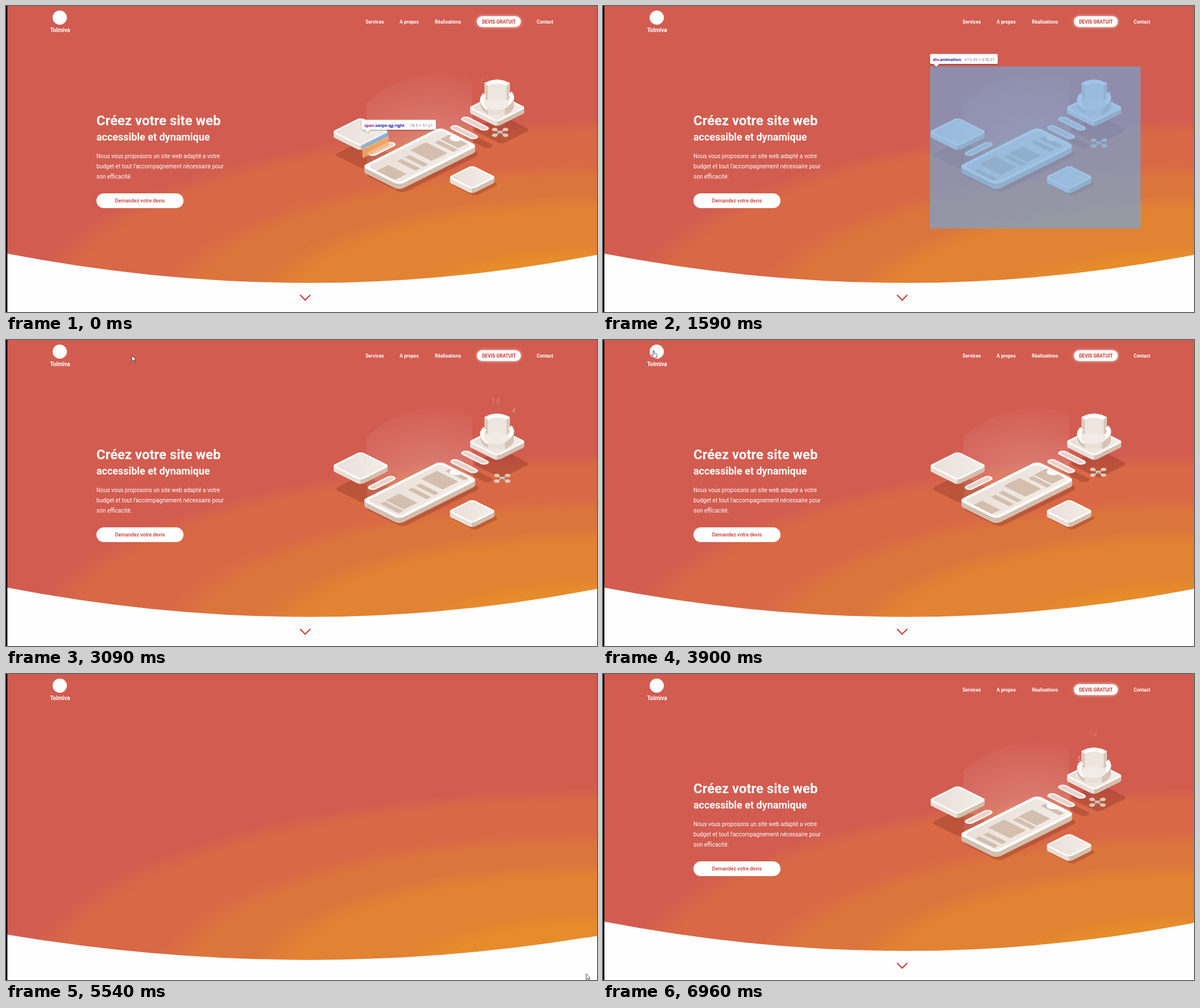
Animation, 1039 px wide and 539 px high, one loop 7060 ms. Source, as an HTML page:

```html
<!DOCTYPE html>
<html lang="fr">
<head>
<meta charset="utf-8">
<title>Tolmiva</title>
<style>
  html, body { margin: 0; width: 100%; height: 100%; overflow: hidden; background: #fefefe; }
  svg { display: block; width: 100%; height: 100%; }
  text { font-family: Roboto, sans-serif; fill: #fff; }
  .nav { font-size: 8.3px; font-weight: 700; }
  .red { fill: #c8382f; }
  .copy { font-size: 10.05px; }
  .glyph { font-weight: 700; text-anchor: middle; fill: #fbd9d2; }
  .tip text, #status text { font-family: "Open Sans", "Noto Sans", sans-serif; font-size: 7.2px; }
  .tip .name { font-weight: 700; fill: #1a1aa6; }
  .tip .tag { fill: #881280; }
  .tip .size { fill: #777; text-anchor: end; }
  #status text { font-size: 6.8px; fill: #d4d4d4; }
</style>
</head>
<body>
<svg id="stage" viewBox="0 0 1039 539" xmlns="http://www.w3.org/2000/svg"></svg>
<script>
const LOOP = 7060;
const SCROLL_PERIOD = 115;
const BEIGE = '#d4bfae', BLUE = 'rgba(111,168,220,.66)',
      ORANGE = 'rgba(246,178,107,.8)', YELLOW = 'rgba(255,229,153,.85)';

// Isometric plane: u runs up-right, v runs down-right.
const iso = (x, y, body) => `<g transform="matrix(1 -.5 1 .5 ${x} ${y})">${body}</g>`;
const rect = (u, v, w, h, r, fill, extra = '') =>
  `<rect x="${u}" y="${v}" width="${w}" height="${h}" rx="${r}" fill="${fill}" ${extra}/>`;
const path = (d, fill, extra = '') => `<path d="${d}" fill="${fill}" ${extra}/>`;
const text = (x, y, cls, body, extra = '') =>
  `<text x="${x}" y="${y}" class="${cls}" ${extra}>${body}</text>`;

function block(x, y, w, h, r, depth, side, inset) {
  let out = '';
  for (let k = depth; k > 0; k--) out += iso(x, y + k, rect(0, 0, w, h, r, side));
  return out + iso(x, y, rect(0, 0, w, h, r, '#fff') +
    rect(inset, inset, w - 2 * inset, h - 2 * inset, r - 2, 'url(#face)'));
}
const tile = (x, y, size) => block(x, y, size, size, 6, 8, 'url(#side)', 3);
const pill = (x, y, w, h) =>
  iso(x, y, rect(1.2, 1.2, w - 2.4, h - 2.4, 5, '#ecd2ca', 'stroke="#fff" stroke-width="2.4"'));
const shadow = (x, y, w, h, r) => iso(x, y, rect(0, 0, w, h, r, '#6e2018', 'opacity=".27"'));

function tip(id, x, y, width, tag, name, size, highlight) {
  return `<g id="${id}" class="tip">${highlight}
    <g filter="url(#drop)">
      <rect x="${x}" y="${y}" width="${width}" height="17.5" rx="2" fill="#fff"/>
      ${path(`M${x + 5.5} ${y + 17}h11l-5.5 5.5z`, '#fff')}
    </g>
    ${text(x + 5, y + 12, 'name', `<tspan class="tag">${tag}</tspan>.${name}`)}
    ${text(x + width - 5.5, y + 12, 'size', size)}</g>`;
}

function screenBlocks() {
  const thin = u => rect(u, 22, 8, 33, 0, BEIGE);
  let out = '';
  for (const u of [-SCROLL_PERIOD, 0, SCROLL_PERIOD])
    out += rect(u, 14, 28, 38, 0, BEIGE) + thin(u + 35) +
      rect(u + 46, 21, 24, 32, 0, BEIGE) + thin(u + 84) + thin(u + 98);
  return out;
}

const podium =
  path('M834 164Q834 180 847 189Q864 195 881 190Q893 183 893 164Z', '#e9dfd7') +
  path('M841 136Q863 124 886 136V168H841Z', '#eee5de') +
  path('M841 136L847 140V166L841 162ZM886 136L880 140V166L886 162Z', '#d9c8bb') +
  path('M841 136Q863 123 886 136L880 140Q863 133 847 140Z', '#fff') +
  path('M842 156Q835 162 838 171Q841 177 847 180M886 153Q892 160 888 168Q885 173 880 175',
       'none', 'stroke="#fff" stroke-width="7.5"') +
  path('M834 168Q837 179 847 184V190Q834 183 834 174ZM877 178Q890 174 893 163V178Q889 188 877 192Z', '#d6c4b6') +
  '<ellipse cx="862.5" cy="173" rx="22" ry="10" fill="#f2ebe6"/>';

const drone = [[-9.5, -5], [9.5, -5], [-9.5, 5], [9.5, 5]].map(([x, y]) =>
  `<path d="M0 0L${x} ${y}" stroke="#c6b3a4" stroke-width="2.2"/>
   <ellipse cx="${x}" cy="${y}" rx="5" ry="3" fill="#dccbbd"/>`).join('') +
  '<ellipse rx="4" ry="2.8" fill="#d5cbc4"/><ellipse cy="2" rx="2" ry="1.6" fill="#77818b"/>';

const bar = (d, color) => path(d, 'none', `stroke="${color}" stroke-width="9" stroke-linecap="round"`);

// Soft steps between the colour bands, from the corner outwards.
function sunsetStops() {
  const colors = ['#e68c2b', '#e28233', '#dc753c', '#d86846', '#d25c50'];
  const edges = [110, 194, 249, 327];
  return edges.map((r, i) => [[r - 12, colors[i]], [r + 12, colors[i + 1]]]).flat()
    .map(([r, color]) => `<stop offset="${r / 380}" stop-color="${color}"/>`).join('');
}

stage.innerHTML = `
<defs>
  <radialGradient id="sunset" gradientUnits="userSpaceOnUse" cx="0" cy="0" r="380"
    gradientTransform="translate(1039 539) scale(3 1)">${sunsetStops()}</radialGradient>
  <radialGradient id="glow" gradientUnits="userSpaceOnUse" cx="0" cy="0" r="122"
    gradientTransform="translate(750 241) scale(1.55 1)">
    <stop offset="0" stop-color="#fff" stop-opacity=".22"/>
    <stop offset=".6" stop-color="#fff" stop-opacity=".1"/>
    <stop offset="1" stop-color="#fff" stop-opacity=".02"/>
  </radialGradient>
  <linearGradient id="face" x2="1" y2="1">
    <stop stop-color="#e9dfd8"/><stop offset="1" stop-color="#f3ede8"/>
  </linearGradient>
  <linearGradient id="side" x2="1" y2="1">
    <stop offset=".5" stop-color="#e9dfd7"/><stop offset=".5" stop-color="${BEIGE}"/>
  </linearGradient>
  <filter id="halo" x="-20%" y="-60%" width="140%" height="220%">
    <feDropShadow dx="0" dy="0" stdDeviation="2.5" flood-color="#fff" flood-opacity=".8"/>
  </filter>
  <filter id="drop" x="-10%" y="-30%" width="120%" height="180%">
    <feDropShadow dx="0" dy="1" stdDeviation="1.2" flood-opacity=".4"/>
  </filter>
  <clipPath id="screen"><rect x="5" y="5" width="128" height="56" rx="4"/></clipPath>
</defs>
<rect width="1039" height="539" fill="#fefefe"/>

<g id="page">
  <path id="hero" fill="url(#sunset)"/>
  <circle cx="94.5" cy="20.5" r="12.5" fill="#fff"/>
  ${text(95, 46, '', 'Tolmiva', 'text-anchor="middle" font-size="10" font-weight="700"')}
  <g id="nav" class="nav">
    ${text(632, 30.5, '', 'Services')}
    ${text(692, 30.5, '', 'A propos')}
    ${text(754, 30.5, '', 'Réalisations')}
    <rect x="828" y="18" width="77" height="19" rx="9.5" fill="#fff" filter="url(#halo)"/>
    ${text(866.5, 30.5, 'red', 'DEVIS GRATUIT', 'text-anchor="middle"')}
    ${text(933, 30.5, '', 'Contact')}
  </g>
  <g id="content">
    ${text(159, 209.6, '', 'Créez votre site web', 'font-size="23.9" font-weight="700"')}
    ${text(159, 236.8, '', 'accessible et dynamique', 'font-size="17.95" font-weight="700"')}
    ${text(159, 268.4, 'copy', 'Nous vous proposons un site web adapté a votre')}
    ${text(159, 286.2, 'copy', "budget et tout l'accompagnement nécessaire pour")}
    ${text(159, 304.1, 'copy', 'son efficacité.')}
    <rect x="159" y="330" width="153" height="26" rx="13" fill="#fff"/>
    ${text(235.5, 346, 'red', 'Demandez votre devis', 'text-anchor="middle" font-size="8.85" font-weight="500"')}

    ${shadow(577, 262, 51, 51, 6)}
    ${shadow(820, 218, 51, 51, 6)}
    ${shadow(782, 314, 42.5, 42.5, 6)}
    ${shadow(802.5, 230, 12, 44, 6)}
    ${shadow(631, 297, 138, 66, 8)}
    ${path('M633 171Q690 120 758 120Q796 120 819 130L821 246L764 216L635 284Z', 'url(#glow)')}
    ${tile(572.5, 221.75, 51)}
    ${pill(632.5, 259.75, 44, 12)}
    ${block(625.3, 282.5, 138, 66, 8, 9, BEIGE, 5)}
    ${iso(625.3, 282.5, `<g clip-path="url(#screen)"><g id="scroll">${screenBlocks()}</g>
      <circle cx="133" cy="33" r="8" fill="#fff"/></g>`)}
    ${tile(777, 301.75, 42.5)}
    ${text(861, 0, 'glyph', '1#', 'id="rank" font-size="14.5"')}
    ${text(893, 0, 'glyph', '€', 'id="euro" font-size="11.5"')}
    ${text(837, 0, 'glyph', '$', 'id="dollar" font-size="11.5"')}
    ${tile(812.5, 179.25, 51)}
    ${podium}
    ${pill(777.5, 214.25, 12, 44)}
    ${pill(796.5, 199.25, 12, 44)}
    <g id="drone">${drone}</g>
  </g>
  <path id="chevron" d="M517 509L526 518L535 509" fill="none" stroke="#c8382f" stroke-width="2"/>
  ${tip('swipeTip', 625, 200.5, 131, 'span', 'swipe-qg-right', '78.5 × 51.21',
    path('M625 245L672 221.5L673 229L626 252Z', BLUE) + path('M626 252L673 229V245L627 268Z', ORANGE))}
  ${tip('divTip', 575, 84.5, 119, 'div', 'animation', '619.39 × 478.27',
    rect(575, 106.5, 370, 285.5, 0, BLUE))}
  ${tip('stairTip', 797, 172.5, 129.5, 'span', 'staircase-ref1', '91.92 × 45.96',
    iso(796, 199.25, rect(1, 1, 11, 43, 0, BLUE, `stroke="${YELLOW}" stroke-width="2"`)))}
</g>

<g id="loader">
  ${bar('M517.5 244L500 275', '#d0453c')}
  ${bar('M534.5 244L552 275', '#5b979f')}
  ${bar('M508.5 292H544.5', '#fbc30f')}
</g>
<g id="status">
  <path d="M2 529.5H178Q180 529.5 180 532V539H2Z" fill="#35363a"/>
  ${text(5, 537.8, '', 'https://vigilant-mestorf-41b7d4.netlify.app/index.html')}
</g>
<g id="cursor" stroke="#222" stroke-width=".8" stroke-linejoin="round">
  ${path('M0 0V10.6L2.5 8.4L4.2 12L5.7 11.3L4.1 7.8H7.2Z', '#fff', 'id="arrow"')}
  ${path('M3 1Q4 0 5 1V5.3L8.6 6.2Q10.4 6.8 10 8.8L9 13.6H4L.4 9Q.4 7.2 2 8L3 9Z', '#fff', 'id="hand"')}
</g>
<rect width="2.4" height="539" fill="#000"/>`;

const el = id => document.getElementById(id);
const clamp = x => Math.max(0, Math.min(1, x));
const ramp = (t, from, to) => clamp((t - from) / (to - from));
const smooth = x => x * x * (3 - 2 * x);
const show = (id, on) => el(id).setAttribute('visibility', on ? 'inherit' : 'hidden');
const fade = (id, a) => el(id).setAttribute('opacity', a);
const move = (id, x, y) => el(id).setAttribute('transform', `translate(${x} ${y})`);

// Interpolates keys of the form [time, ...values].
function track(keys, t, ease = x => x) {
  const i = keys.findIndex(key => key[0] > t);
  if (i === 0) return keys[0].slice(1);
  if (i < 0) return keys.at(-1).slice(1);
  const a = keys[i - 1], b = keys[i], p = ease((t - a[0]) / (b[0] - a[0]));
  return a.slice(1).map((v, k) => v + (b[k + 1] - v) * p);
}

const cursorKeys = [[2280, 995, 19], [2400, 995, 29], [2550, 995, 29], [3240, 116, 27], [3360, 85, 18],
  [4170, 85, 18], [4450, 520, 240], [4660, 894, 403], [4800, 894, 403], [5280, 1020, 528]];

function rise(id, t, base, peak, starts) {
  const start = starts.find(s => t >= s && t < s + 2000);
  const p = start === undefined ? 0 : (t - start) / 2000;
  el(id).setAttribute('y', base - 38 * p);
  fade(id, peak * Math.sin(Math.PI * p));
}

function draw(t) {
  const loading = t >= 4450 && t < 5280, reloaded = t >= 5280;
  show('page', !loading);
  show('loader', loading);
  show('status', t >= 4050 && t < 5280);

  const drop = reloaded ? track([[5280, 1.7], [5540, 1], [5750, .35], [6000, 0]], t)[0] : 0;
  el('hero').setAttribute('d',
    `M0 0H1039V${438.2 + 23 * drop}Q530 ${538.4 + 9 * drop} 0 ${435.8 + 23 * drop}Z`);
  fade('nav', reloaded ? ramp(t, 5750, 6180) : 1);
  fade('content', reloaded ? ramp(t, 5800, 6330) : 1);
  fade('chevron', reloaded ? ramp(t, 6100, 6400) : 1);

  show('swipeTip', t < 540);
  show('divTip', t >= 540 && t < 1680);
  show('stairTip', t >= 1680 && t < 2550);

  const scrolled = reloaded ? 254 - .031 * t : 71 - .031 * t;
  move('scroll', (scrolled + 2 * SCROLL_PERIOD) % SCROLL_PERIOD, 0);
  const bob = Math.cos(.3 + 2 * Math.PI * (reloaded ? t - 6530 : t) / 5400);
  move('drone', 870.8 - 2.2 * bob, 234.5 - 12.5 * bob);
  rise('rank', t, 145, .45, [1400, 5160]);
  rise('euro', t, 158, .65, [1500]);
  rise('dollar', t, 169, .35, [-1800, 6120]);

  const hand = t >= 3360 && t < 4880;
  show('cursor', t >= 2280 && t < 5750);
  show('hand', hand);
  show('arrow', !hand);
  move('cursor', ...track(cursorKeys, t, smooth));
}

const began = performance.now();
(function tick() {
  draw((performance.now() - began) % LOOP);
  requestAnimationFrame(tick);
})();
</script>
</body>
</html>
```
